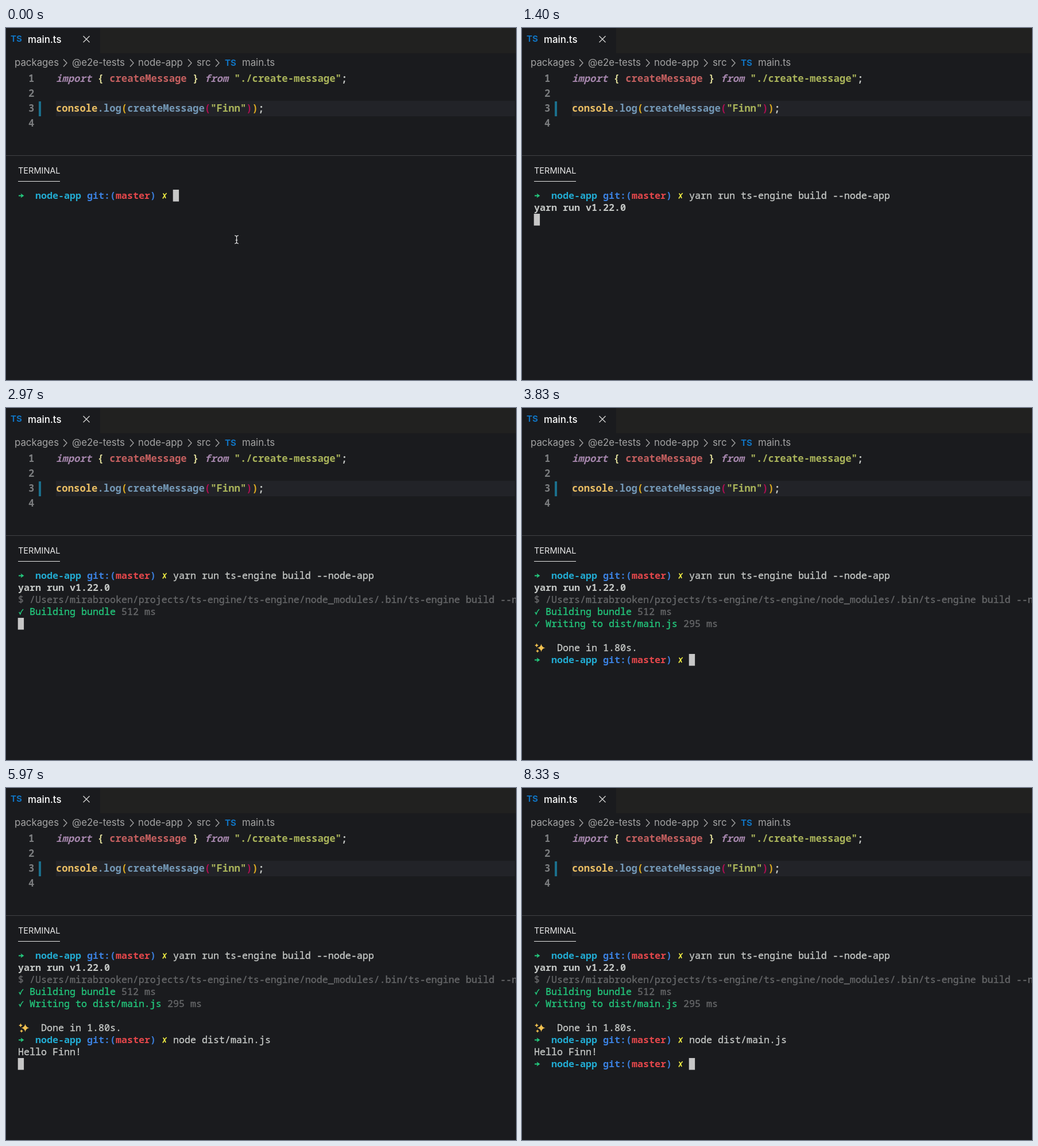
These frames come from a looping animation (888 by 614 pixels, 8.36 s). An HTML page:

```html
<!DOCTYPE html>
<html lang="en">
<head>
<meta charset="utf-8">
<title>Terminal build</title>
<style>
  html, body { margin: 0; width: 100%; height: 100%; overflow: hidden; background: #1a1b1e; }
  svg { display: block; width: 888px; height: 614px; }
  text { white-space: pre; }
  .ui { font-family: Inter, Roboto, sans-serif; }
  .code { font: 600 17.25px "Noto Sans Mono", "DejaVu Sans Mono", monospace; }
  .term { font: 500 16.667px "Noto Sans Mono", "DejaVu Sans Mono", monospace; stroke-width: .35px; }
  .bold { font-weight: 700; stroke-width: 0; }
</style>
</head>
<body>
<svg id="stage" viewBox="0 0 888 614" xmlns="http://www.w3.org/2000/svg">
  <rect width="888" height="614" fill="#1a1b1e"/>
  <rect x="164" width="724" height="44" fill="#212120"/>
  <rect x="87" y="127" width="799" height="27" fill="#222328"/>
  <rect x="57" y="128" width="4" height="26" fill="#1b6f8c"/>
  <rect y="222" width="888" height="1" fill="#414245"/>
  <rect x="21" y="267" width="73" height="1" fill="#e7e7e7"/>
  <path d="M134.5 14l11 11m0-11l-11 11" stroke="#d0d0d0" stroke-width="1.4"/>
  <g id="chrome"></g>
  <g id="terminal"></g>
  <rect id="cursor" width="10.4" height="20.6" fill="#c7c7c7"/>
  <g id="pointer" fill="none" stroke-linecap="round">
    <path id="beam" d="M398.5 362q2.5 0 3 2q.5-2 3-2M401.5 364v10M398.5 376q2.5 0 3-2q.5 2 3 2M400 370h3"
      stroke="#eee" stroke-width="1.2"/>
  </g>
</svg>
<script>
const NS = "http://www.w3.org/2000/svg";
const LOOP = 8360, LEFT = 21, CELL = 10, ROW = 21, TOP = 282;
const byId = id => document.getElementById(id);

function add(parent, tag, attrs, content = "") {
  const el = document.createElementNS(NS, tag);
  for (const key in attrs) el.setAttribute(key, attrs[key]);
  el.textContent = content;
  return parent.appendChild(el);
}

// Tab, breadcrumbs and panel title
const chrome = byId("chrome");
const label = (x, y, size, fill, str, weight = 400) =>
  add(chrome, "text", { x, y, class: "ui", "font-size": size, fill, "font-weight": weight }, str);

label(8, 24, 15, "#1073c0", "TS", 700);
label(38, 26, 16.8, "#ffffff", "main.ts", 450);
label(381, 66, 15, "#1073c0", "TS", 700);
[[15, "packages"], [115, "@e2e-tests"], [230, "node-app"], [332, "src"], [411, "main.ts"]]
  .forEach(([x, str]) => label(x, 66, 16.8, "#a3a3a3", str));
for (const x of [100, 216, 317, 365])
  add(chrome, "path", { d: `M${x} 54.5l6 6.5l-6 6.5`, fill: "none", stroke: "#a3a3a3", "stroke-width": 1.4 });
label(21, 254, 14.5, "#e7e7e7", "TERMINAL");

// Source code: [colour, text, italic]
const plain = "#c5c8c6", blue = "#7397b5", lime = "#a9b35a", mauve = "#a586ac", crimson = "#ad0f52";
const source = [
  [[mauve, "import", 1], ["#d8d595", " { "], ["#c45f5f", "createMessage"], ["#d8d595", " } "],
   [mauve, "from", 1], [lime, ' "./create-message"'], [plain, ";"]],
  [],
  [["#e9bd63", "console"], [blue, ".log"], ["#dfac21", "("], [blue, "createMessage"], [crimson, "("],
   [lime, '"Finn"'], [crimson, ")"], ["#dfac21", ")"], [plain, ";"]],
  []
];
source.forEach((parts, i) => {
  const y = 94 + 26 * i;
  add(chrome, "text", { x: 39, y, class: "code", fill: "#7c7e80" }, i + 1);
  const line = add(chrome, "text", { x: 87, y, class: "code" });
  for (const [fill, str, italic] of parts)
    add(line, "tspan", { fill, "font-style": italic ? "italic" : "normal" }, str);
});

// Terminal
const green = "#23c77c", gray = "#666769", cyan = "#22abd2", azure = "#3b80df", red = "#e5474b", yellow = "#f3f043";
const terminal = byId("terminal");
const print = (group, row, col, fill, str, bold) => add(group, "text", {
  x: LEFT + CELL * col, y: TOP + ROW * row + 16, fill, stroke: fill, class: bold ? "term bold" : "term"
}, str);
const icon = (group, row, col, d, attrs) =>
  add(group, "path", { d, transform: `translate(${LEFT + CELL * col} ${TOP + ROW * row})`, ...attrs });
const stroke = (color, width) => ({ fill: "none", stroke: color, "stroke-width": width });

const shown = [];
function block(at, draw) {
  const group = add(terminal, "g", {});
  draw(group);
  shown.push({ at, group });
}

const prompt = row => g => {
  icon(g, row, 0, "M1 9.4H5.6L4.6 6.6L10.4 10.5L4.6 14.4L5.6 11.6H1Z", { fill: green });
  print(g, row, 3, cyan, "node-app", true);
  print(g, row, 12, azure, "git:(", true);
  print(g, row, 17, red, "master", true);
  print(g, row, 23, azure, ")", true);
  icon(g, row, 25, "M2.5 6.5Q5 9 7 15M8.6 6Q5 9.5 2 15.5", stroke(yellow, 1.7));
};
const task = (row, str, time) => g => {
  icon(g, row, 0, "M1.8 11L3.8 14.5Q5.5 9 9 6", stroke(green, 1.6));
  print(g, row, 2, green, str);
  print(g, row, 3 + str.length, gray, time);
};
const star = (x, y, r) => {
  const n = r * .15;
  return `M${x} ${y - r}Q${x + n} ${y - n} ${x + r} ${y}Q${x + n} ${y + n} ${x} ${y + r}` +
    `Q${x - n} ${y + n} ${x - r} ${y}Q${x - n} ${y - n} ${x} ${y - r}Z`;
};

block(0, prompt(0));
block(1200, g => print(g, 1, 0, plain, "yarn run v1.22.0", true));
block(1480, g => print(g, 2, 0, gray,
  "$ /Users/mirabrooken/projects/ts-engine/ts-engine/node_modules/.bin/ts-engine build --node-app"));
block(2750, task(3, "Building bundle", "512 ms"));
block(3060, task(4, "Writing to dist/main.js", "295 ms"));
block(3110, g => {
  icon(g, 6, 0, star(12.5, 10.5, 7) + star(4.5, 6, 3.5) + star(6, 16, 3), { fill: "#f0c050" });
  print(g, 6, 4, plain, "Done in 1.80s.");
});
block(3230, prompt(7));
block(5880, g => print(g, 8, 0, plain, "Hello Finn!"));
block(6000, prompt(9));

const inputs = [
  { el: print(terminal, 0, 27, plain, ""), keys: [[450, "yarn run ts-engine build --node-app"]] },
  { el: print(terminal, 7, 27, plain, ""), keys: [
    [4200, "n"], [4310, "no"], [4420, "nod"], [4530, "node"], [4650, "node "], [4800, "node d"],
    [4920, "node di"], [5130, "node dist/"], [5380, "node dist/m"], [5500, "node dist/main.js"]] }
];

// Cursor: [time, row, column]
const cursorStops = [[0, 0, 27], [1000, 1, 0], [1200, 2, 0], [1480, 3, 0], [2750, 4, 0], [3060, 5, 0],
  [3110, 7, 0], [3230, 7, 27], [5750, 8, 0], [5880, 9, 0], [6000, 9, 27]];

const latest = (list, t) => list.filter(item => item[0] <= t).pop();

function render(t) {
  for (const { at, group } of shown) group.style.display = t >= at ? "" : "none";
  const typed = inputs.map(({ el, keys }) => el.textContent = (latest(keys, t) || [0, ""])[1]);
  let [, row, col] = latest(cursorStops, t);
  if (col && row === 0) col += typed[0].length;
  if (col && row === 7) col += typed[1].length;
  byId("cursor").setAttribute("x", LEFT + CELL * col - .3);
  byId("cursor").setAttribute("y", TOP + ROW * row);
  byId("pointer").style.display = t < 450 ? "" : "none";
}

const start = performance.now();
function tick() {
  render((performance.now() - start) % LOOP);
  requestAnimationFrame(tick);
}
render(0);
requestAnimationFrame(tick);
</script>
</body>
</html>
```
